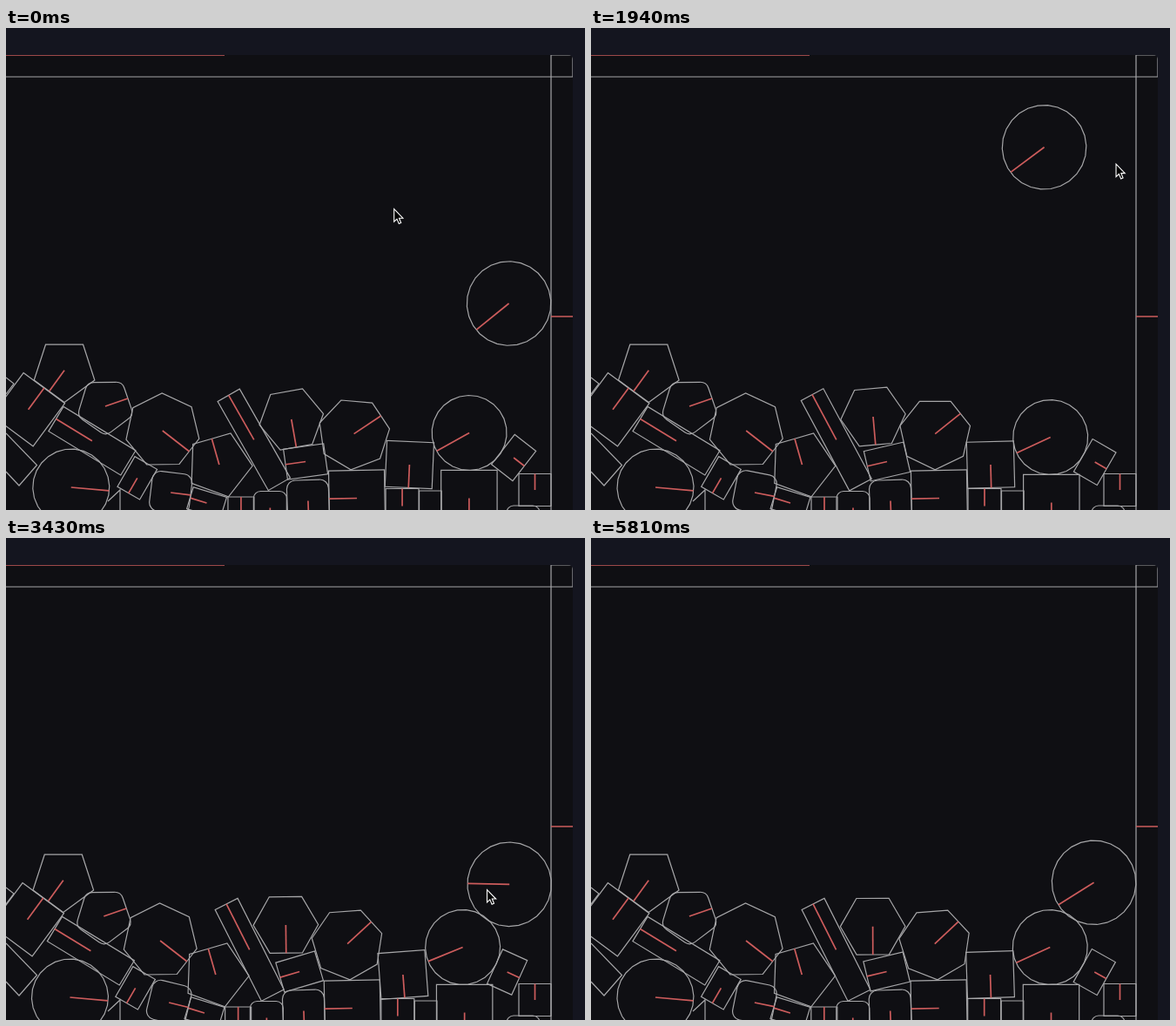
These frames come from a looping animation (665x553 px, 5.91 s). An HTML page with a canvas:

```html
<!DOCTYPE html>
<html lang="en">
<head>
<meta charset="utf-8">
<title>Falling shapes</title>
<style>
  html, body { margin: 0; width: 100%; height: 100%; overflow: hidden; background: #14151f; }
  canvas { display: block; width: 665px; height: 553px; }
</style>
</head>
<body>
<canvas id="stage" width="665" height="553"></canvas>
<script>
const ctx = document.getElementById('stage').getContext('2d');
const LOOP = 5910, STEP = 149, LAST = 39;
const LINE = '#a6a6a8', MARK = '#cd5c5c';
const rad = deg => deg * Math.PI / 180;
const linear = u => u;
const smooth = u => u * u * (3 - 2 * u);

// Moves through a few key points of the form [step, ...values]
function through(keys, s, ease = linear) {
  const i = Math.max(1, keys.findIndex(k => k[0] >= s));
  const [p, q] = s > keys.at(-1)[0] ? [keys.at(-1), keys.at(-1)] : [keys[i - 1], keys[i]];
  const u = p === q ? 0 : ease((s - p[0]) / (q[0] - p[0]));
  return p.slice(1).map((v, k) => v + (q[k + 1] - v) * u);
}

function stroke(color, width) {
  ctx.strokeStyle = color;
  ctx.lineWidth = width;
  ctx.stroke();
}

function path(color, width, ...pts) {
  ctx.beginPath();
  pts.forEach(p => ctx.lineTo(...p));
  stroke(color, width);
}

// Outlines in local space; the marker runs from the centre along +x to the edge
function ngon(n, r, round = 0) {
  const reach = r * Math.cos(Math.PI / n);
  const corner = i => [1, 2].map(k =>
    r * (k === 1 ? Math.cos : Math.sin)((2 * i + 1) * Math.PI / n));
  return {
    reach,
    draw() {
      ctx.moveTo(reach, 0);
      for (let i = 0; i < n; i++) ctx.arcTo(...corner(i), ...corner(i + 1), round);
      ctx.closePath();
    }
  };
}
const box = (w, h, round = 0) => ({
  reach: w,
  draw() { ctx.roundRect(-w, -h, 2 * w, 2 * h, round); }
});
const disc = r => ngon(26, r);

function drawBody(shape, x, y, deg) {
  ctx.save();
  ctx.translate(x, y);
  ctx.rotate(rad(deg));
  ctx.beginPath();
  shape.draw();
  stroke(LINE, 1.2);
  path(MARK, 1.7, [0, 0], [shape.reach, 0]);
  ctx.restore();
}

// twist: turns with the pressure; roll: turns a little further at each impact
const pile = [];
const add = (shape, x, y, deg, motion = {}) => pile.push({ shape, x, y, deg, ...motion });

add(ngon(5, 36.6), 66.3, 392.8, 126);
add(box(30.6, 29.5), 25, 437.7, -53.5);
add(disc(44), 74, 527, 5);
add(box(48.5, 16.5), 98, 473.7, -148.7);
add(ngon(5, 34, 10), 113, 434, -19);
add(ngon(7, 43), 178.2, 462, 37.8);
add(ngon(5, 38.3), 242.5, 501, -106);
add(box(58.7, 14.5), 281.8, 472.3, -118.2, { roll: 1.5 });
add(ngon(6, 37.3), 324, 446, 85, { roll: 5, rise: 3 });
add(box(23.3, 17.6), 340, 497.5, 167, { twist: -5 });
add(ngon(7, 41.3), 395.2, 465.6, -38.5, { roll: -4.8 });
add(box(26.5, 27), 459, 501, 88.5, { twist: -4 });
add(disc(43), 527.7, 469.5, 155, { twist: 4 });
add(box(15.5, 21.7), 578.7, 498, 30, { twist: -8 });
add(box(20, 14.8), 149.5, 516.3, 120);
add(box(20, 13), 229, 545, 197);

// Bottom row: crates and rounded blocks
add(box(23, 23, 10), 188, 533, 11, { twist: 4 });
add(box(20, 15), 268, 558, -90);
add(box(19, 19, 8), 301, 550.5, 90);
add(box(24, 24, 10), 344, 542.5, 88);
add(box(32, 32), 400, 539.5, 179);
add(box(20, 19), 452, 548.5, -90);
add(box(25, 12.8), 484.3, 556, 90);
add(box(32.2, 32.2), 528.8, 544.5, 90);
add(box(18.5, 18.5), 607.5, 530, -90);
add(box(19, 19, 8), 594, 567, 90);

const pressure = [[0, -1], [1.5, -1], [3.5, 0], [20, 0], [21.5, .7], [24, .7], [28, -.12], [31, -.12], [33, .1]];
const rolled = [[0, -1], [1.5, -1], [3.5, 0], [20, 0], [21.5, .85], [LAST, .95]];

// Bodies yield more the nearer they lie to the ball; those at the wall stay
function drawPile(s) {
  const [press] = through(pressure, s);
  const [turn] = through(rolled, s);
  const relax = Math.max(0, -press);
  for (const { shape, x, y, deg, twist = 0, roll = 0, rise = 0 } of pile) {
    const fixed = x > 590;
    const give = fixed ? 0 : Math.min(.6 + 4.6 * (x / 390) ** 2, 4.4) * (y > 530 ? .7 : 1);
    const lift = rise * press + (x > 500 && !fixed ? 5 * relax : 0);
    drawBody(shape, x - give * press, y - lift, deg + twist * press + roll * turn);
  }
}

// The ball: falls under gravity along the wall, is dragged up twice
const WALL_X = 577.6, REST_Y = 395.3, GRAVITY = 12;
const fall = (n, y) => [WALL_X, Math.min(REST_Y, y + GRAVITY * n * n)];
const firstDrag = [[5, 578, REST_Y], [9, 512.5, 148.7], [12, 510, 136], [16, WALL_X, 141]];
const secondDrag = [[23, 578.2, 397.3], [28.67, WALL_X, 299]];
const spin = [[0, 141], [5, 127.3], [9, 128], [17, 158.6], [23, 181], [31, 162.7], [LAST, 148]];

function ballAt(s) {
  if (s < 5) return fall(s + 1.19, 299);
  if (s < 16) return through(firstDrag, s, smooth);
  if (s < 23) return fall(s - 16, 141);
  if (s < 28.67) return through(secondDrag, s, smooth);
  return fall(s - 28.67, 299);
}

const pointer = [
  [0, 445.5, 207.7], [5, 570.3, 394.3], [9, 553.3, 153.7], [16, 640, 158],
  [17, 641.5, 159.5], [23, 552.3, 403.5], [28, 560, 300], [31, 436.6, 314.8]
];

function drawPointer(x, y) {
  ctx.save();
  ctx.translate(x + .2, y);
  ctx.beginPath();
  [[0, 0], [0, 14.5], [3.3, 11.4], [5.6, 16.8], [8, 15.8], [5.8, 10.5], [10.2, 10.5]]
    .forEach(p => ctx.lineTo(...p));
  ctx.closePath();
  ctx.fillStyle = '#000';
  ctx.fill();
  stroke('#fff', 1.1);
  ctx.restore();
}

function drawWalls() {
  ctx.beginPath();
  ctx.rect(-149, 6, 800, 50);
  ctx.rect(626, 31, 50, 600);
  stroke(LINE, 1.2);
  path(MARK, 1.5, [251, 31], [-149, 31]);
  path(MARK, 1.5, [651, 331], [626, 331]);
}

// Edges of bodies that lie mostly outside the view
function drawEdges() {
  path(LINE, 1.2, [0, 401], [9, 408], [0, 420]);
  path(LINE, 1.2, [0, 465], [35.5, 501.5], [15, 525], [0, 509]);
  path(LINE, 1.2, [117, 543], [131, 530], [131, 553]);
}

function render(ms) {
  const s = Math.min(LAST, Math.floor((ms % LOOP + 5) / STEP));
  ctx.fillStyle = '#14151f';
  ctx.fillRect(0, 0, 665, 553);
  ctx.save();
  ctx.beginPath();
  ctx.roundRect(-149, 31, 800, 600, 5);
  ctx.clip();
  ctx.fillStyle = '#0f0f13';
  ctx.fillRect(0, 31, 651, 522);
  drawWalls();
  drawEdges();
  drawPile(s);
  drawBody(disc(48.3), ...ballAt(s), ...through(spin, s));
  ctx.restore();
  if (s < 32) drawPointer(...through(pointer, s));
}

const start = performance.now();
function tick() {
  render(performance.now() - start);
  requestAnimationFrame(tick);
}
tick();
</script>
</body>
</html>
```
